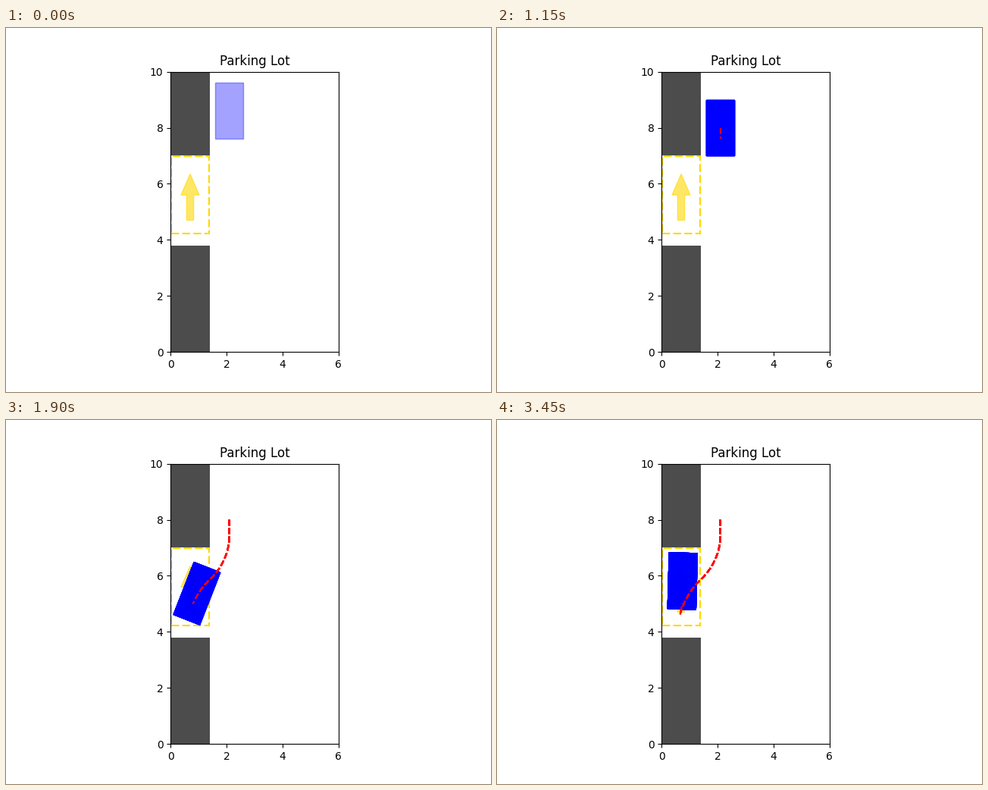
These frames come from a looping animation (640 px wide and 480 px high, 4.1 s). A matplotlib script:

```python
import numpy as np
import matplotlib.pyplot as plt
from matplotlib.animation import FuncAnimation
from matplotlib.patches import Polygon, Rectangle

FRAMES, INTERVAL = 82, 50
WAIT = 20            # frames before the car starts to move
STEP = 0.2           # distance driven per frame
WIDTH, LENGTH, REAR = 1.0, 2.0, 0.4

# Heading change per step, in degrees: straight, steer, counter-steer, pull forward.
turns = ([0] * 3 + [3.8] + [5.5] * 4 + [5.15] * 4
         + [-4.17] * 6 + [-4.1] + [-5.25] * 3)
gears = np.array([-1] * 19 + [1] * 3)
MOVES = len(turns)

headings = np.radians(np.cumsum(turns))
steps = STEP * gears[:, None] * np.column_stack([np.sin(headings), np.cos(headings)])
axle = np.vstack([[2.1, 8.0], [2.1, 8.0] + np.cumsum(steps, axis=0)])
headings = np.concatenate([[0], headings])


def car_corners(move):
    """Corners of the car, turned about its rear axle."""
    angle = headings[move]
    forward = np.array([np.sin(angle), np.cos(angle)])
    right = np.array([forward[1], -forward[0]])
    back, front = -REAR, LENGTH - REAR
    half = WIDTH / 2
    return [axle[move] + side * right + along * forward
            for side, along in [(-half, back), (half, back),
                                (half, front), (-half, front)]]


fig, ax = plt.subplots(figsize=(6.4, 4.8), dpi=100)
ax.set_aspect("equal")
ax.set_xlim(0, 6)
ax.set_ylim(0, 10)
ax.set_title("Parking Lot")

for bottom, height in [(7, 3), (0, 3.8)]:
    ax.add_patch(Rectangle((0, bottom), 1.4, height,
                           facecolor="black", alpha=0.7, linewidth=0))
ax.add_patch(Rectangle((0.02, 4.22), 1.36, 2.76, fill=False, edgecolor="gold",
                       linewidth=1.5, linestyle=(0, (5, 2))))
ax.arrow(0.7, 4.7, 0, 0.9, width=0.25, head_width=0.65, head_length=0.75,
         color="gold", alpha=0.6)

# The car is painted once more each frame, so its translucent blue builds up.
coats = [ax.add_patch(Polygon(car_corners(0), closed=True, color="blue", alpha=0.2))
         for _ in range(FRAMES + 1)]
trails = [ax.plot(*axle[:count].T, "r--", linewidth=1.5)[0]
          for count in range(1, MOVES + 1)]
ax.set_xlim(0, 6)
ax.set_ylim(0, 10)


def update(frame):
    move = min(max(frame - WAIT, 0), MOVES)
    corners = car_corners(move)
    for i, coat in enumerate(coats):
        coat.set_xy(corners)
        coat.set_visible(i < frame + 2)
    for i, trail in enumerate(trails):
        trail.set_visible(i < move)
    return coats + trails


anim = FuncAnimation(fig, update, frames=FRAMES, interval=INTERVAL,
                     repeat=True, repeat_delay=0, blit=False)
plt.show()
```
